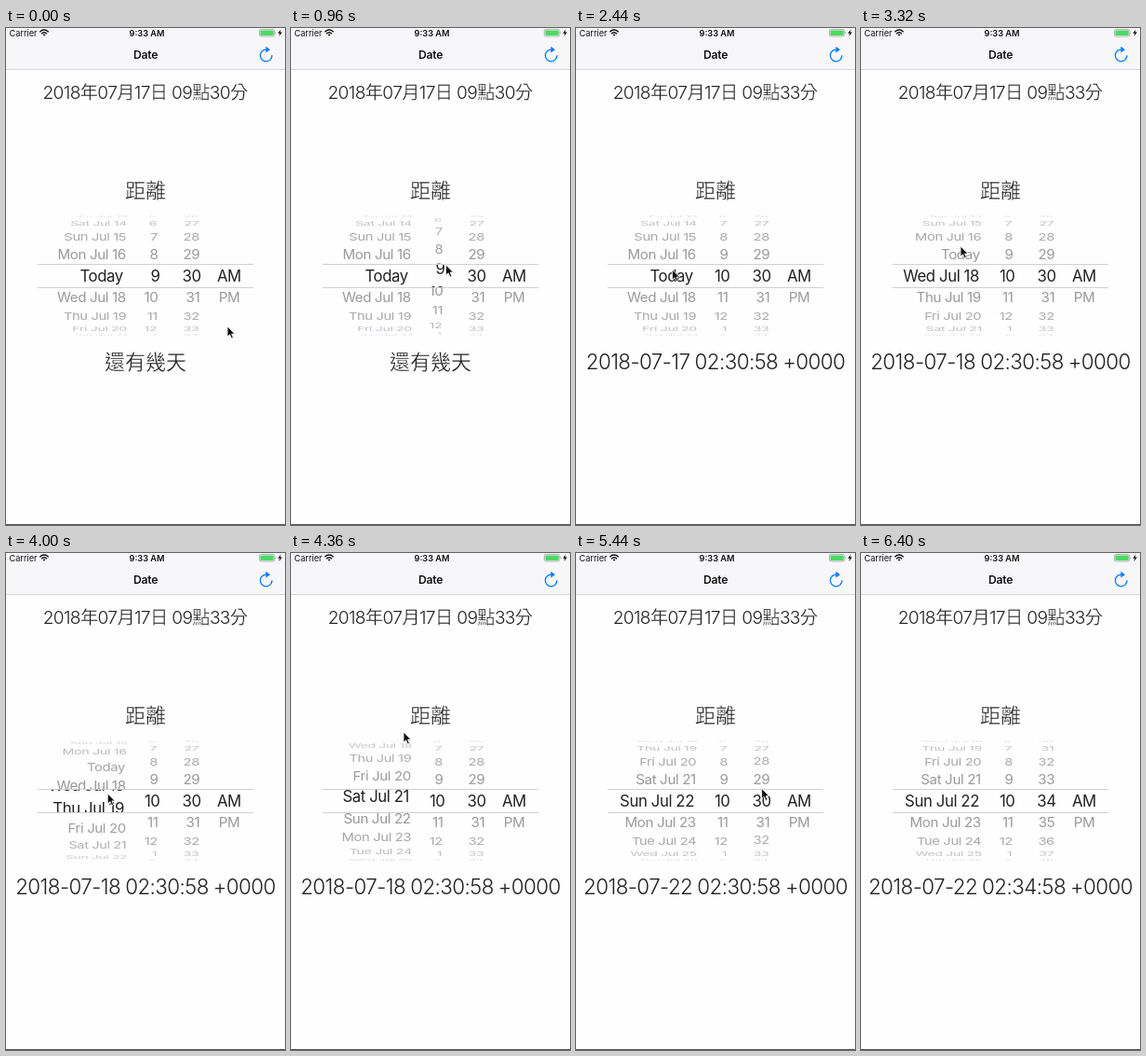
Recreate the animation shown at these times as an HTML page. Size 300 by 533 pixels, loop 6.76 s.

```html
<!DOCTYPE html>
<html lang="zh-Hant">
<head>
<meta charset="utf-8">
<title>Date</title>
<style>
  html, body { margin: 0; width: 100%; height: 100%; overflow: hidden; background: #fefdff; }
  svg { display: block; width: 100vw; height: 100vh; }
  text { font-family: Inter, "Noto Sans CJK TC", "Noto Sans CJK", sans-serif; fill: #111; white-space: pre; }
  .mid { text-anchor: middle; }
  .status { font-size: 9.2px; }
  .title { font-size: 12.2px; font-weight: 600; letter-spacing: -.02em; }
  .now, .big { font-weight: 300; fill: #222; }
  .now { font-size: 19.2px; letter-spacing: -.034em; }
  .big { font-size: 22px; }
  .stamp { font-size: 22.4px; letter-spacing: -.026em; word-spacing: -.03em; }
  /* A background-coloured outline slims the regular CJK strokes. */
  .han { stroke: #fefdff; stroke-width: .35; }
  .wheel text { font-size: 16.8px; letter-spacing: -.025em; }
  .outer text { fill: #949494; }
  .band text { fill: #222; }
</style>
</head>
<body>
<svg viewBox="0 0 300 533">
  <defs>
    <clipPath id="outside"><path d="M0 200H300V253H0zM0 279H300V331H0z"/></clipPath>
    <clipPath id="inside"><path d="M0 254H300V278H0z"/></clipPath>
  </defs>
  <rect width="300" height="533" fill="#fefdff"/>
  <rect width="300" height="44" fill="#f7f6f9"/>
  <rect y="44" width="300" height="1" fill="#d6d5d8"/>
  <rect y="532" width="300" height="1" fill="#555"/>

  <text class="status" x="3.5" y="8.6">Carrier</text>
  <g fill="none" stroke="#111" stroke-width="1.3">
    <path d="M36.3 4.2Q41 -.2 45.7 4.2M38 6.2Q41 3.4 44 6.2"/>
    <path d="M39.5 7.1Q41 5.8 42.5 7.1L41 8.8z" fill="#111" stroke="none"/>
  </g>
  <text class="status mid" x="151.5" y="8.6" font-weight="600">9:33 AM</text>
  <rect x="272.4" y="1.4" width="16.4" height="7.6" rx="1.8" fill="none" stroke="#999" stroke-width=".7"/>
  <rect x="273.4" y="2.4" width="14.4" height="5.6" rx="1" fill="#4cd964"/>
  <path d="M289.5 3.9Q290.8 5.2 289.5 6.5z" fill="#777"/>
  <path d="M295.6 1.5L292.2 5.7H294.4L293.5 9L297 4.6H294.8z" fill="#111"/>

  <text class="title mid" x="150" y="33">Date</text>
  <path d="M286 29.3A6.3 6.3 0 1 1 279.7 23.2" fill="none" stroke="#007aff" stroke-width="1.3"/>
  <path d="M279.4 19.8L284 23.2L279.4 26.6z" fill="#007aff"/>

  <text class="now mid" x="149.5" y="76">2018<tspan class="han">年</tspan>07<tspan class="han">月</tspan>17<tspan class="han">日</tspan> 09<tspan class="han">點</tspan><tspan id="minute"></tspan><tspan class="han">分</tspan></text>
  <text class="big han mid" x="150" y="182.3">距離</text>
  <g class="wheel outer" clip-path="url(#outside)"></g>
  <g class="wheel band" clip-path="url(#inside)"></g>
  <path d="M34 253.5H266M34 278.5H266" stroke="#d0d0d3"/>
  <text id="result" class="big mid" x="150" y="366.3"></text>
  <path id="cursor" d="M0 0V11.2L2.6 8.8L4.5 13L6.4 12.2L4.6 8.1H8z" fill="#111" stroke="#fff" stroke-width=".8"/>
</svg>
<script>
const LOOP = 6760, STEP = 40;
const CENTER = 266, RADIUS = 64, ANGLE = 20.8 * Math.PI / 180;
const DAYS = ['Tue', 'Wed', 'Thu', 'Fri', 'Sat', 'Sun', 'Mon'];
const $ = selector => document.querySelector(selector);
const mod = (n, size) => (n % size + size) % size;
const smooth = p => (1 - Math.cos(p * Math.PI)) / 2;
const settle = p => 1 - (1 - p) ** 2;

// Each key: time, values, easing towards that key.
const cursorKeys = [
  [0, [238, 320]], [320, [164, 266]],
  [800, [164, 266]], [1120, [169, 242]],
  [1960, [169, 242]], [2440, [103.5, 259]],
  [2680, [103.5, 259]], [2960, [107, 234]],
  [3480, [107, 234]], [3720, [106, 276]],
  [3840, [106, 276]], [4360, [121, 192]],
  [4760, [121, 192]], [5240, [199, 256]],
  [5400, [199, 256]], [5720, [214, 163]],
  [6320, [214, 163]], [6360, [219, 163]]
];
const CURSOR_GONE = 6400;

const columns = [
  { right: 127, pivot: 145,
    label: i => i ? `${DAYS[mod(i, 7)]} Jul ${17 + i}` : 'Today\u200a',
    keys: [[2680, [0]], [2960, [.75]], [3280, [1], settle],
           [3840, [1]], [4360, [4.2]], [4840, [5], settle]] },
  { right: 165.5, pivot: 145,
    label: i => mod(8 + i, 12) + 1,
    keys: [[800, [0]], [1120, [.62]], [1320, [.62]], [1800, [1], settle]] },
  { right: 209.7, pivot: 195,
    label: i => String(mod(30 + i, 60)).padStart(2, '0'),
    keys: [[5430, [0]], [5720, [3.6]], [6080, [4], settle]] },
  { right: 252.8, pivot: 237,
    label: i => ['AM', 'PM'][i] || '',
    keys: [[0, [0]]] }
];

const labels = [
  [0, '30', '還有幾天'],
  [1840, '33', '2018-07-17 02:30:58 +0000'],
  [3320, '33', '2018-07-18 02:30:58 +0000'],
  [4880, '33', '2018-07-22 02:30:58 +0000'],
  [6120, '33', '2018-07-22 02:34:58 +0000']
];

function sample(keys, t) {
  const next = keys.findIndex(key => key[0] > t);
  if (next === 0) return keys[0][1];
  if (next < 0) return keys[keys.length - 1][1];
  const [t0, from] = keys[next - 1];
  const [t1, to, ease = smooth] = keys[next];
  const p = ease((t - t0) / (t1 - t0));
  return from.map((v, i) => v + (to[i] - v) * p);
}

function makeRows(parent, column, reach) {
  return Array.from({ length: 2 * reach + 1 }, (_, n) => {
    const node = document.createElementNS('http://www.w3.org/2000/svg', 'text');
    node.setAttribute('x', column.right - column.pivot);
    node.setAttribute('y', 6.1);
    node.setAttribute('text-anchor', 'end');
    parent.append(node);
    return { node, shift: n - reach };
  });
}

for (const column of columns) {
  column.outer = makeRows($('.outer'), column, 4);
  column.band = makeRows($('.band'), column, 1);
}

function setText(node, value) {
  if (node.textContent !== String(value)) node.textContent = value;
}

function drawRows(column, rows, position, inBand) {
  for (const { node, shift } of rows) {
    const index = Math.round(position) + shift;
    const angle = (index - position) * ANGLE;
    const cos = Math.cos(angle);
    const visible = Math.abs(angle) < 1.54;
    node.style.display = visible ? '' : 'none';
    if (!visible) continue;
    const scale = inBand ? 1 : .91 - .13 * (1 - cos);
    const y = CENTER + RADIUS * Math.sin(angle) * (inBand ? 1.06 : 1);
    setText(node, column.label(index));
    node.setAttribute('transform', `translate(${column.pivot} ${y}) scale(${scale} ${scale * cos})`);
    node.setAttribute('opacity', inBand ? 1 : .2 + .8 * cos);
  }
}

function draw(t) {
  for (const column of columns) {
    const [position] = sample(column.keys, t);
    drawRows(column, column.outer, position, false);
    drawRows(column, column.band, position, true);
  }
  const [start, minute, result] = labels.filter(entry => entry[0] <= t).pop();
  setText($('#minute'), minute);
  setText($('#result'), result);
  $('#result').classList.toggle('stamp', start > 0);
  $('#result').classList.toggle('han', start === 0);
  const [x, y] = sample(cursorKeys, t);
  $('#cursor').setAttribute('transform', `translate(${x} ${y})`);
  $('#cursor').style.display = t < CURSOR_GONE ? '' : 'none';
}

function tick() {
  const t = performance.now() % LOOP;
  draw(Math.floor(t / STEP) * STEP);
  requestAnimationFrame(tick);
}
tick();
</script>
</body>
</html>
```
